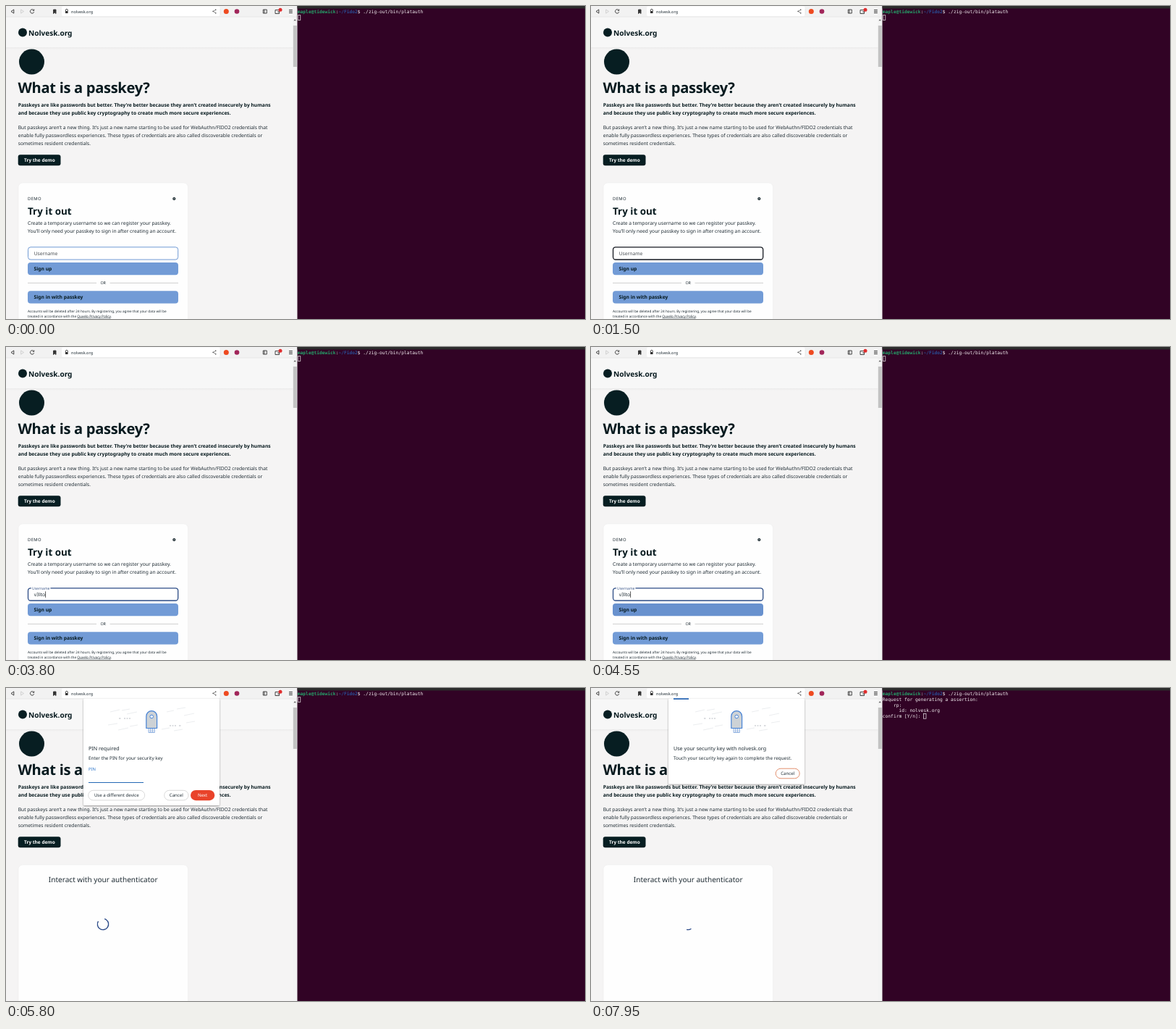
Animation of 800 by 432 pixels, one loop 8000 ms. Source, as an HTML page:

```html
<!DOCTYPE html>
<html lang="en">
<head>
<meta charset="utf-8">
<title>Passkey sign-up</title>
<style>
  html, body { margin: 0; width: 100%; height: 100%; overflow: hidden; }
  svg { display: block; width: 800px; height: 432px; }
  text { font: 6.71px "Noto Sans", sans-serif; fill: #1e2b33; white-space: pre; text-rendering: geometricPrecision; }
  .bold { font-weight: 700; fill: #071a1f; }
  .brand { font-size: 10.1px; font-weight: 800; }
  .title { font-size: 20.13px; letter-spacing: -.016em; }
  .subtitle { font-size: 13.42px; }
  .small { font-size: 4.72px; }
  .dialogTitle { font-size: 7.13px; }
  .dialogText { font-size: 6.37px; }
  .pill { font-size: 6.1px; font-weight: 500; text-anchor: middle; }
  .terminal text { font: 6.27px "DejaVu Sans Mono", monospace; fill: #f4f0f2; }
  .icon { fill: none; stroke: #333; stroke-width: .9; }
</style>
</head>
<body>
<svg viewBox="0 0 800 432">
  <defs>
    <filter id="shadow" x="-10%" y="-10%" width="120%" height="125%">
      <feDropShadow dx="0" dy="1" stdDeviation="1.3" flood-opacity=".4"/>
    </filter>
    <linearGradient id="headerShade" x2="0" y2="1">
      <stop stop-color="#ebebeb"/><stop offset="1" stop-color="#f5f4f4"/>
    </linearGradient>
  </defs>

  <!-- Page -->
  <rect width="403" height="432" fill="#f5f4f4"/>
  <rect y="15" width="397" height="42" fill="#f7f7f7"/>
  <rect y="57" width="397" height="3" fill="url(#headerShade)"/>
  <circle cx="23" cy="36.500" r="6" fill="#071e22"/>
  <text class="bold brand" x="31" y="41">Nolvesk.org</text>
  <circle cx="35.500" cy="77" r="17.500" fill="#071e22"/>
  <text class="bold title" x="16.500" y="120">What is a passkey?</text>
  <text class="bold" x="16.700" y="138.800">Passkeys are like passwords but better. They’re better because they aren’t created insecurely by humans</text>
  <text class="bold" x="16.700" y="149.500">and because they use public key cryptography to create much more secure experiences.</text>
  <text x="16.700" y="170.300">But passkeys aren’t a new thing. It’s just a new name starting to be used for WebAuthn/FIDO2 credentials that</text>
  <text x="16.700" y="181">enable fully passwordless experiences. These types of credentials are also called discoverable credentials or</text>
  <text x="16.700" y="191.700">sometimes resident credentials.</text>
  <rect x="16.700" y="205.300" width="58.800" height="15" rx="3" fill="#071e22"/>
  <text class="bold" x="25" y="215.200" style="font-size:6.5px;fill:#fff">Try the demo</text>
  <rect x="17" y="244" width="234.500" height="200" rx="6" fill="#fefefe" stroke="#ececec" stroke-width=".6"/>

  <!-- Sign-up form -->
  <g id="form">
    <text x="30" y="268" style="font-size:5.87px;letter-spacing:.06em">DEMO</text>
    <circle cx="232.300" cy="266" r="1.400" fill="none" stroke="#08191f" stroke-width="1.300"/>
    <text class="bold subtitle" x="30" y="288">Try it out</text>
    <text x="30" y="302.200">Create a temporary username so we can register your passkey.</text>
    <text x="30" y="312.900">You’ll only need your passkey to sign in after creating an account.</text>
    <rect id="field" x="30.500" y="332.800" width="207.200" height="17.200" rx="3.500" fill="#fff"/>
    <rect id="notch" x="34.800" y="331" width="26.600" height="4" fill="#fefefe"/>
    <text id="label">Username</text>
    <text id="username" x="38.700" y="343.900"></text>
    <rect id="fieldCaret" y="337.300" width=".7" height="8.500" fill="#111"/>
    <rect id="signUp" x="30" y="354" width="208" height="17.200" rx="4"/>
    <text class="bold" x="38.500" y="365">Sign up</text>
    <path d="M30 382.300H125M143.500 382.300H238" stroke="#c4c4c4" stroke-width=".8"/>
    <text x="134.200" y="384.400" text-anchor="middle" style="font-size:5.4px">OR</text>
    <rect x="30" y="393.300" width="208" height="17.300" rx="4" fill="#729bd6"/>
    <text class="bold" x="38.500" y="404.300">Sign in with passkey</text>
    <text class="small" x="30" y="422.500">Accounts will be deleted after 24 hours. By registering, you agree that your data will be</text>
    <text class="small" x="30" y="429.700">treated in accordance with the <tspan text-decoration="underline">Quvelo Privacy Policy</tspan>.</text>
  </g>

  <!-- Waiting card -->
  <g id="waiting">
    <text x="134.200" y="267.600" text-anchor="middle" style="font-size:10.06px">Interact with your authenticator</text>
    <g transform="translate(134 326) scale(.379)">
      <circle id="spinner" r="20.200" fill="none" stroke="#2a4a88" stroke-width="3.600"/>
    </g>
  </g>

  <!-- Scrollbar and toolbar -->
  <rect x="396.500" y="15" width="6.500" height="417" fill="#f3f3f3"/>
  <rect x="396.800" y="27" width="5" height="57" fill="#c3c3c3"/>
  <path d="M397.500 20.300l1.700-2 1.700 2z" fill="#555"/>
  <rect width="403" height="15" fill="#f2f2f2"/>
  <rect x="77" y=".5" width="218.500" height="13.500" rx="2" fill="#fff"/>
  <path d="M0 15H402" stroke="#dedede" stroke-width=".6"/>
  <text x="90" y="9.600" style="font-size:5.5px">nolvesk.org</text>
  <g class="icon">
    <path d="M10.800 4.900v5.200L7 7.500z"/>
    <path d="M20.700 4.900v5.200l3.800-2.600z" stroke="#ccc"/>
    <path d="M38.300 5.800a2.700 2.700 0 1 0 .4 2.400M38.800 4.500v1.800h-2"/>
    <path d="M65.500 5h3.500v5.500l-1.750-1.500-1.750 1.500z" fill="#333"/>
    <path d="M82.300 7V5.800a1.500 1.500 0 0 1 3 0V7"/>
    <path d="M82 7h3.600v3H82z" fill="#333" stroke="none"/>
    <path d="M289.800 5.200l-3.700 2.200 3.700 2.300" stroke-width=".6"/>
    <path d="M289.300 5.200h1M285.500 7.400h1M289.300 9.700h1" stroke-width="1.400"/>
    <path d="M296.300 4v8" stroke="#ddd" stroke-width=".5"/>
    <path d="M355.300 5h5v5h-5zM357 5v5"/>
    <path d="M372 5.500h5.500v5H372zM375 8h2.500"/>
    <path d="M391 5.500h4.800M391 7.500h4.800M391 9.500h4.800"/>
  </g>
  <circle cx="304.300" cy="7.500" r="3.500" fill="#ee4a20"/>
  <circle cx="319" cy="7.500" r="3.300" fill="#a1265a"/>
  <circle cx="379" cy="5.300" r="2.500" fill="#e02d2d"/>

  <!-- Security key dialog -->
  <g id="dialog">
    <rect id="sheet" x="107" y="14.500" width="188" rx="1.500" fill="#fff" filter="url(#shadow)"/>
    <path d="M144 33l13-3M160 31l11-2M167 36l14-3M141 51l13-2M155 58l14-3M171 53l11-2M222 33l10-2M236 29l12-2M246 38l14-3M215 57l11-2M232 59l12-2M249 48l12-2" stroke="#e3e5e8" stroke-width=".7"/>
    <path d="M156 42h2.500M163 42h2M166.500 42h2M170 42h2M226 52h2M229.500 52h2M233 52h2M239 52h2.500" stroke="#cfd2d6" stroke-width="1.300"/>
    <path d="M193.800 55.500V39a7.400 7.400 0 0 1 14.800 0v16.500z" fill="#cdd2d6" stroke="#4682d5" stroke-width="1.200"/>
    <circle cx="201.200" cy="39.500" r="2.300" fill="#fff" stroke="#4682d5" stroke-width="1"/>
    <path d="M197 56v5.500h8.400V56M199.800 56v5M202.600 56v5" fill="#e7edf5" stroke="#6a98d8" stroke-width=".7"/>
    <g id="pinStep">
      <text class="dialogTitle" x="114" y="86">PIN required</text>
      <text class="dialogText" x="114" y="98.700">Enter the PIN for your security key</text>
      <text x="114" y="114.300" style="font-size:5.8px;fill:#2a72c8">PIN</text>
      <text id="pin" x="113.700" y="126.200" style="font-size:5.8px"></text>
      <rect id="pinCaret" y="120.800" width=".7" height="6.500" fill="#111"/>
      <path d="M114 130.500h76" stroke="#2469b5"/>
      <g fill="#fff" stroke="#cbcbcb" stroke-width=".7">
        <rect x="113.700" y="141.300" width="78" height="13.600" rx="6.800"/>
        <rect x="218.700" y="141.300" width="33.300" height="13.600" rx="6.800"/>
        <rect x="255" y="141" width="33.300" height="14.200" rx="7.100" fill="#e9432a" stroke="none"/>
      </g>
      <text class="pill" x="152.800" y="150.300">Use a different device</text>
      <text class="pill" x="235.300" y="150.300">Cancel</text>
      <text class="pill" x="271.600" y="150.300" style="fill:#fff">Next</text>
    </g>
    <g id="touchStep">
      <rect id="progress" x="114" y="14" height="2" fill="#4278bd"/>
      <text class="dialogTitle" x="114" y="86">Use your security key with nolvesk.org</text>
      <text class="dialogText" x="114" y="98.700">Touch your security key again to complete the request.</text>
      <rect x="255.200" y="111.200" width="33" height="13.600" rx="6.800" fill="#fff" stroke="#e2906f"/>
      <text class="pill" x="271.700" y="120.200">Cancel</text>
    </g>
  </g>

  <!-- Terminal -->
  <g class="terminal">
    <rect x="402.500" width="398" height="432" fill="#310325"/>
    <rect x="402.500" width="398" height="3.500" fill="#2c2c2c"/>
    <text x="402.800" y="10.300"><tspan font-weight="700" fill="#26a269">maple@tidewick</tspan>:<tspan font-weight="700" fill="#2a4f96">~/Fido2</tspan>$ ./zig-out/bin/platauth</text>
    <g id="output">
      <text x="402.800" y="17.900">Request for generating a assertion:</text>
      <text x="402.800" y="25.500">    rp:</text>
      <text x="402.800" y="33.100">      id: nolvesk.org</text>
      <text x="402.800" y="40.700">confirm [Y/n]: </text>
    </g>
    <rect id="shellCursor" width="3.500" height="6.800" fill="none" stroke="#eee" stroke-width=".7"/>
  </g>
</svg>
<script>
const LOOP = 8000;
const HOVER = 800, FOCUS = 1650, SPIN = 4965, WAIT = 5000, DIALOG = 5300, TOUCH = 7600, OUTPUT = 7700;
const USER = "v3lto", USER_KEYS = [2550, 3250, 3450, 3600, 3750];
const PIN_KEYS = [6450, 6650, 6850, 7050];

const el = {};
document.querySelectorAll("[id]").forEach(node => el[node.id] = node);

const set = (node, attrs) => { for (const key in attrs) node.setAttribute(key, attrs[key]); };
const show = (node, on) => node.style.display = on ? "" : "none";
const ramp = (t, start, length) => Math.min(1, Math.max(0, (t - start) / length));
const mix = (a, b, p) => a + (b - a) * p;
const mixColor = (a, b, p) => `rgb(${a.map((v, i) => Math.round(mix(v, b[i], p)))})`;
const easeOut = p => 1 - (1 - p) ** 3;
const easeInOut = p => .5 - .5 * Math.cos(Math.PI * p);
const typed = (t, keys) => keys.filter(time => time <= t).length;

function type(t, text, keys, node, caret, focus) {
  const count = typed(t, keys);
  const shown = text.slice(0, count);
  if (node.textContent !== shown) node.textContent = shown;
  const width = count ? node.getComputedTextLength() : 0;
  set(caret, { x: +node.getAttribute("x") + width + .2 });
  show(caret, t >= focus && (count > 0 || (t - focus) % 1000 < 500));
}

function drawForm(t) {
  const focus = easeOut(ramp(t, FOCUS, 200));
  const blue = [112, 154, 212], black = [20, 24, 32], navy = [43, 75, 133];
  const border = t < FOCUS ? mixColor(blue, black, ramp(t, HOVER, 150)) : mixColor(black, navy, focus);
  set(el.field, { stroke: border, "stroke-width": t < HOVER ? 1 : 1.3 });
  set(el.label, {
    transform: `translate(${mix(38.7, 36, focus)} ${mix(343.9, 335.2, focus)}) scale(${mix(1, .75, focus)})`
  });
  el.label.style.fill = mixColor([70, 75, 80], [62, 90, 140], focus);
  show(el.notch, t >= FOCUS);
  set(el.signUp, { fill: mixColor([114, 155, 214], [104, 145, 206], ramp(t, 4200, 250)) });
  type(t, USER, USER_KEYS, el.username, el.fieldCaret, FOCUS + 50);
}

function drawSpinner(t) {
  const phase = (t - SPIN) % 1400 / 1400;
  const grow = easeInOut(ramp(phase, 0, .5)), slide = easeInOut(ramp(phase, .5, .5));
  set(el.spinner, {
    transform: `rotate(${phase * 360})`,
    "stroke-dasharray": `${mix(1, 100, grow)} 200`,
    "stroke-dashoffset": -15 * grow - 110 * slide
  });
}

function draw(t) {
  const waiting = t >= WAIT, touch = t >= TOUCH, output = t >= OUTPUT;
  show(el.form, !waiting);
  show(el.waiting, waiting);
  if (waiting) drawSpinner(t); else drawForm(t);

  show(el.dialog, t >= DIALOG);
  show(el.pinStep, !touch);
  show(el.touchStep, touch);
  set(el.sheet, { height: touch ? 118 : 147.5 });
  type(t, "••••", PIN_KEYS, el.pin, el.pinCaret, DIALOG);
  set(el.progress, { width: 21 * ramp(t, TOUCH, 350) });

  show(el.output, output);
  set(el.shellCursor, output ? { x: 459.5, y: 35.4 } : { x: 403.3, y: 12.7 });
}

(function frame() {
  draw(performance.now() % LOOP);
  requestAnimationFrame(frame);
})();
</script>
</body>
</html>
```
